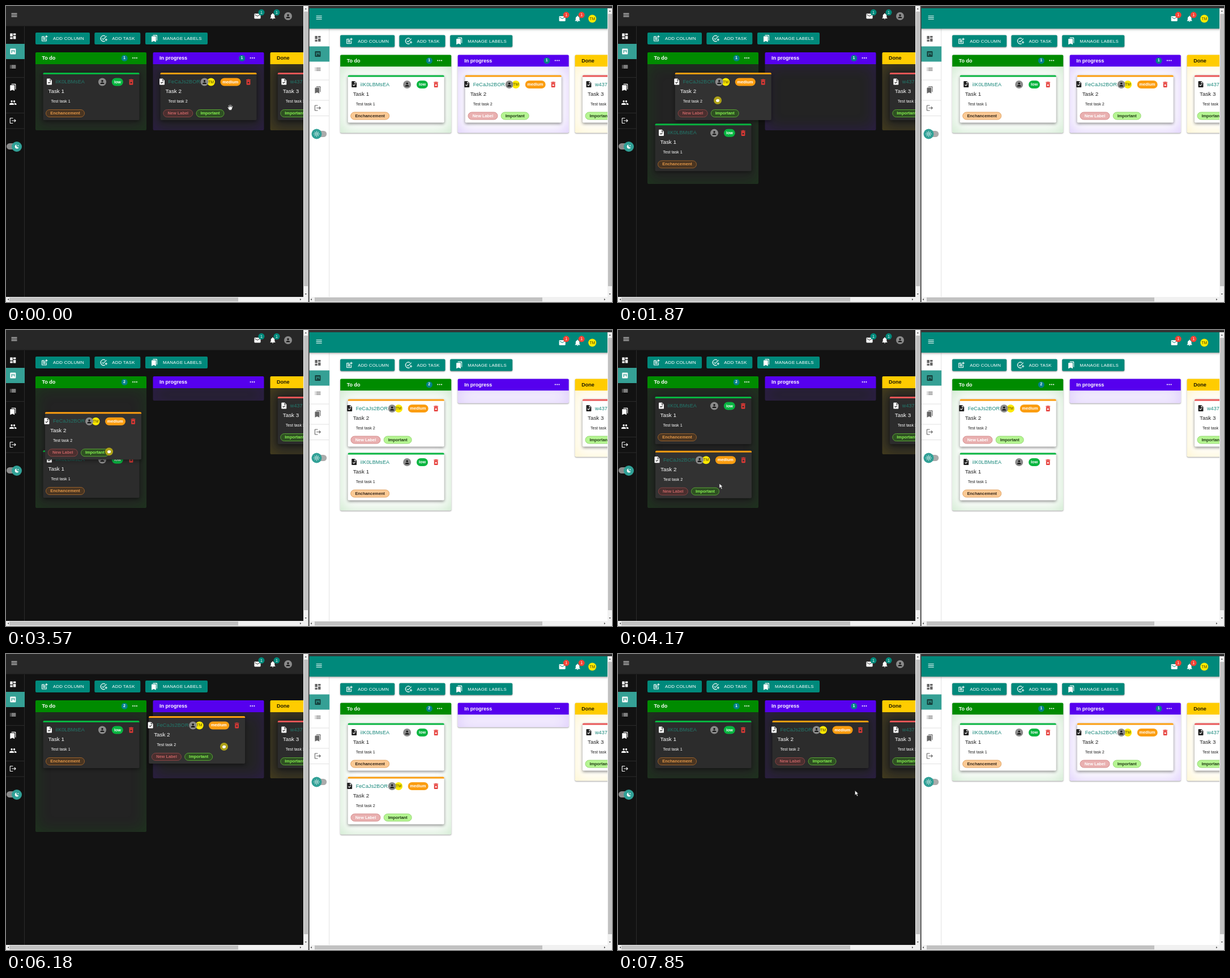
An HTML page that plays this animation: 1070 by 524 pixels, repeating every 7.92 s.

```html
<!DOCTYPE html>
<html lang="en">
<head>
<meta charset="utf-8">
<title>Task boards</title>
<style>
html, body { margin: 0; width: 100%; height: 100%; overflow: hidden; background: #121212; }
body { position: relative; font: 9px "Liberation Sans", Arial, sans-serif; }
div, svg { position: absolute; left: 0; top: 0; box-sizing: border-box; }
svg { fill: currentColor; fill-rule: evenodd; overflow: visible; }
.text { line-height: 0; white-space: nowrap; }
.middle { transform: translateX(-50%); }
.panel { overflow: hidden; }

.dark { background: #121212; color: #fff; --line: #2b2b2b; --bar: #272727; --icon: #fff; --active: #fff;
  --badge: #00897b; --body: #232323; --card: #2c2c2c; --ink: #fff; --link: #22776b;
  --shadow: 0 2px 6px rgb(0 0 0 / .45); --glow: .2; --raise: none; }
.light { background: #fff; color: #222; --line: #e2e2e2; --bar: #00897b; --icon: #666; --active: #153f3b;
  --badge: #f44336; --body: #fff; --card: #fff; --ink: #222; --link: #17877a;
  --shadow: 0 2px 5px rgb(0 0 0 / .45); --glow: .22;
  --raise: 0 1px 1px rgb(0 0 0 / .25), 0 1px 3px rgb(0 0 0 / .25); }

.bar { background: var(--bar); color: #fff; }
.light .bar { box-shadow: 0 1px 2px rgb(0 0 0 / .2), 0 2px 3px rgb(0 0 0 / .14), 0 1px 6px rgb(0 0 0 / .12); }
.side { border-right: 1px solid var(--line); }
.rule { background: var(--line); }
.active { background: #35a095; color: var(--active); }
.badge { background: var(--badge); border-radius: 50%; color: #fff; font-size: 7px; }
.track { background: #8c8c8c; border-radius: 6px; }
.light .track { background: #ababab; }
.knob { background: #30a096; border-radius: 50%; color: #fff; }
.button { background: #00897b; border-radius: 2px; color: #fff; box-shadow: var(--raise);
  font-size: 7.85px; letter-spacing: .0286em; }

.column { border-radius: 2px; box-shadow: var(--raise); }
.head { background: rgb(var(--accent)); border-radius: 2px 2px 0 0; color: #fff; font-weight: bold; }
.head.bright { color: #1c1800; }
.body { background: var(--body); border-radius: 0 0 2px 2px;
  box-shadow: inset 0 0 28px rgb(var(--accent) / var(--glow)); }
.count { background: #00808a; border-radius: 50%; font-size: 7px; }

.card { background: var(--card); color: var(--ink); border-radius: 2px; box-shadow: var(--shadow); }
.card.lifted { background: #323232; }
.stripe { border-radius: 2px 2px 0 0; }
.id { color: var(--link); letter-spacing: .0094em; }
.title { font-size: 9.85px; }
.note { font-size: 7.15px; }
.chip { border-radius: 7px; color: #fff; font-size: 7.25px; font-weight: bold; }
.label { border: 1px solid; border-radius: 7px; font-size: 7.4px; font-weight: bold; }
.avatar { background: #8a8a8a; color: #151515; border-radius: 50%; }
.initials { background: #ffe900; color: #4c4600; border-radius: 50%; font-size: 7px; }
.bin { color: #e53935; }
.dark .orange { background: #4a3521; border-color: #96602c; color: #e09648; }
.dark .red { background: #4b2f2f; border-color: #854444; color: #c56464; }
.dark .green { background: #2e5022; border-color: #58a236; color: #86f04f; }
.light .orange { background: #fbc994; border-color: #e0a466; color: #33261a; }
.light .red { background: #e9b0b0; border-color: #d68f8f; color: #fff; }
.light .green { background: #b5f592; border-color: #98d876; color: #1f3a13; }

.scroll { background: #f1f1f1; }
.thumb { background: #c1c1c1; }
.arrow { color: #505050; }
#cursor svg { color: #fff; }
#cursor .hand, #cursor .pointer { stroke: #222; stroke-width: 1.2; }
.halo { background: #aca018; border-radius: 50%; }
</style>
</head>
<body>
<script>
const LOOP = 7920;
const PITCH = 95;
const FIRST = [65.5, 118], SECOND = [65.5, 118 + PITCH], NEXT = [272.5, 118];

const icons = {
  menu: 'M3 18h18v-2H3zm0-5h18v-2H3zm0-7v2h18V6z',
  dashboard: 'M3 13h8V3H3zm0 8h8v-6H3zm10 0h8V11h-8zm0-18v6h8V3z',
  board: 'M5 3h14a2 2 0 0 1 2 2v14a2 2 0 0 1-2 2H5a2 2 0 0 1-2-2V5a2 2 0 0 1 2-2zm2 4v10h2.5V7zm4 0v5h2.5V7zm4 0v8h2.5V7z',
  list: 'M3 13h2v-2H3zm0 4h2v-2H3zm0-8h2V7H3zm4 4h14v-2H7zm0 4h14v-2H7zM7 7v2h14V7z',
  bookmarks: 'M19 18l2 1V3c0-1.1-.9-2-2-2H9C7.9 1 7 1.9 7 3h10c1.1 0 2 .9 2 2zM15 5H5c-1.1 0-2 .9-2 2v16l7-3 7 3V7c0-1.1-.9-2-2-2z',
  people: 'M16 11a3 3 0 1 0 0-6 3 3 0 0 0 0 6zm-8 0a3 3 0 1 0 0-6 3 3 0 0 0 0 6zm0 2c-2.3 0-7 1.2-7 3.5V19h14v-2.5C15 14.2 10.3 13 8 13zm8 0-1 .1c1.2.8 2 1.9 2 3.4V19h6v-2.5c0-2.3-4.7-3.5-7-3.5z',
  logout: 'M17 7l-1.4 1.4L18.2 11H8v2h10.2l-2.6 2.6L17 17l5-5zM4 5h8V3H4c-1.1 0-2 .9-2 2v14c0 1.1.9 2 2 2h8v-2H4z',
  mail: 'M20 4H4c-1.1 0-2 .9-2 2v12c0 1.1.9 2 2 2h16c1.1 0 2-.9 2-2V6c0-1.1-.9-2-2-2zm0 4l-8 5-8-5V6l8 5 8-5z',
  bell: 'M12 22c1.1 0 2-.9 2-2h-4c0 1.1.9 2 2 2zm6-6v-5c0-3.1-1.6-5.6-4.5-6.3V4a1.5 1.5 0 0 0-3 0v.7C7.6 5.4 6 7.9 6 11v5l-2 2v1h16v-1z',
  person: 'M12 12a4 4 0 1 0 0-8 4 4 0 0 0 0 8zm0 2c-2.7 0-8 1.3-8 4v2h16v-2c0-2.7-5.3-4-8-4z',
  addColumn: 'M17 19H5V7h7V5H5c-1.1 0-2 .9-2 2v12c0 1.1.9 2 2 2h12c1.1 0 2-.9 2-2v-7h-2zM19 2h-2v3h-3v2h3v3h2V7h3V5h-3zM7 9h8v2H7zm0 3h8v2H7zm0 3h8v2H7z',
  addTask: 'M22 5.2 10.6 16.6 6.4 12.4l1.4-1.4 2.8 2.8 10-10zM12 20a8 8 0 1 1 4.3-14.7l1.4-1.5A10 10 0 1 0 16.8 20.8l-1.5-1.5A8 8 0 0 1 12 20zm7-5h-3v2h3v3h2v-3h3v-2h-3v-3h-2z',
  task: 'M14 2H6c-1.1 0-2 .9-2 2v16c0 1.1.9 2 2 2h12c1.1 0 2-.9 2-2V8zm-3 16-3.6-3.5L8.8 13l2.2 2.2 4.2-4.3 1.4 1.4zM13 9V3.5L18.5 9z',
  bin: 'M6 19c0 1.1.9 2 2 2h8c1.1 0 2-.9 2-2V7H6zm2.5-7.1 1.4-1.4 2.1 2.1 2.1-2.1 1.4 1.4-2.1 2.1 2.1 2.1-1.4 1.4-2.1-2.1-2.1 2.1-1.4-1.4 2.1-2.1zM15.5 4l-1-1h-5l-1 1H5v2h14V4z',
  dots: 'M6 10a2 2 0 1 0 0 4 2 2 0 0 0 0-4zm6 0a2 2 0 1 0 0 4 2 2 0 0 0 0-4zm6 0a2 2 0 1 0 0 4 2 2 0 0 0 0-4z',
  moon: 'M11 4a8 8 0 1 0 9 11A8 8 0 0 1 11 4zm6 1 1 2 2 1-2 1-1 2-1-2-2-1 2-1z',
  sun: 'M12 7a5 5 0 1 0 0 10 5 5 0 0 0 0-10zm0 2a3 3 0 1 1 0 6 3 3 0 0 1 0-6zM11 1h2v4h-2zm0 18h2v4h-2zM1 11h4v2H1zm18 0h4v2h-4zM4 5.5 5.5 4 8 6.5 6.500 8zm12 12 1.5-1.5 2.5 2.5-1.5 1.5zM4 18.5 6.5 16 8 17.5 5.5 20zm12-12L18.5 4 20 5.5 17.5 8z',
  up: 'M12 8l5 7H7z', down: 'M12 16l5-7H7z', left: 'M8 12l7-5v10z', right: 'M16 12l-7-5v10z',
  pointer: 'M6 4v16l4-4 3 7 3-1.3-3-6.7h5z',
  hand: 'M8 22 3 13l2-2 3 3L5 6l2-1 3 6V3h2.5l.5 8 2-7 2 .5-1 8 3-5 2 1-3 9-2 4.5z',
  fist: 'M7 20 4 14V10l3-1V7l3-1 2 .5 3-.5 2 1.5 3 1v6l-3 5z'
};

// Everything is placed by transform so that fractional positions are not rounded.
const box = (x, y, w, h, cls = '', inner = '', style = '') =>
  `<div class="${cls}" style="transform:translate(${x}px,${y}px);width:${w}px;height:${h}px;${style}">${inner}</div>`;
const text = (x, y, str, cls = '') => `<div class="text ${cls}" style="left:${x}px;top:${y}px">${str}</div>`;
const icon = (name, cx, cy, size = 13.4, cls = '') =>
  `<svg class="${cls}" viewBox="0 0 24 24" width="${size}" height="${size}" style="transform:translate(${cx - size / 2}px,${cy - size / 2}px)"><path d="${icons[name]}"/></svg>`;
const disc = (cx, cy, r, cls, inner = '') => box(cx - r, cy - r, 2 * r, 2 * r, cls, inner);
const avatar = (cx, cy) => disc(cx, cy, 7, 'avatar', icon('person', 7, 7, 10.5));
const initials = (cx, cy) => disc(cx, cy, 7, 'initials', text(7, 7, 'TM', 'middle'));
const badge = (cx, cy) => disc(cx, cy, 5.5, 'badge', text(5.5, 5.5, '1', 'middle'));

const button = (x, w, name, label) =>
  box(x, 47, w, 21, 'button', icon(name, 16, 10.5) + text(31, 10.5, label));

const column = (x, rgb, name, cls, extra = '') =>
  box(x, 82, 196, 138, `column ${cls}`,
    box(0, 0, 196, 21, `head ${extra}`, text(11.5, 9.8, name) +
      disc(157, 10, 5.3, 'count', text(5.3, 5.3, '1', 'middle')) + icon('dots', 175.5, 10)) +
    box(0, 21, 196, 117, 'body'), `--accent:${rgb}`);

const pill = (x, w, str, cls) => box(x, 65, w, 14, `label ${cls}`, text(w / 2 - 1, 6, str, 'middle'));

function card({ cls, number, id, color, inset = 11, chip, chipX, chipW, people, labels }) {
  return box(0, 0, 170, 83.5, `card ${cls}`,
    box(0, 0, 170, 3, 'stripe', '', `background:${color}`) +
    icon('task', inset, 16) + text(inset + 11, 16, id, 'id') + people +
    box(chipX, 9.5, chipW, 13.5, 'chip', text(chipW / 2, 6.7, chip, 'middle'), `background:${color}`) +
    icon('bin', 155.5, 16.5, 13.4, 'bin') +
    text(9, 33, `Task ${number}`, 'title') + text(14, 51, `Test task ${number}`, 'note') + labels);
}

function app(dark) {
  const shift = dark ? 0 : -27;
  const sideIcons = [['dashboard', 53.5], ['list', 107.5], ['bookmarks', 144], ['logout', 203 + shift]];
  if (dark) sideIcons.push(['people', 171]);
  const toggle = dark
    ? box(1, 243, 22, 11, 'track') + disc(19, 249, 9, 'knob', icon('moon', 9, 9, 11))
    : box(8, 216.5, 20, 11, 'track') + disc(10.3, 222, 9, 'knob', icon('sun', 9, 9, 11));
  return box(-4, 36, 37, 500, 'side') +
    box(-4, -.5, 560, 36, 'bar', icon('menu', 18.5, 16.5) +
      icon('mail', 448, 18.5) + badge(455, 11.8) + icon('bell', 475, 18.5) + badge(482, 11.8) +
      (dark ? avatar(502, 18.5) : initials(501, 18.5))) +
    [126, 189 + shift, 216.5 + shift].map(y => box(-4, y, 36, 1, 'rule')).join('') +
    box(-4, 67, 36.5, 27, 'active', icon('board', 16.3, 13.5)) +
    `<div style="color:var(--icon)">${sideIcons.map(([n, y]) => icon(n, 12.3, y)).join('')}${toggle}</div>` +
    button(52, 95.5, 'addColumn', 'ADD COLUMN') +
    button(156.3, 81, 'addTask', 'ADD TASK') +
    button(246, 109.5, 'bookmarks', 'MANAGE LABELS') +
    column(52, '0 139 0', 'To do', 'todo') +
    column(259.5, '86 0 238', 'In progress', 'progress') +
    column(466.5, '255 204 0', 'Done', 'done', 'bright') +
    card({ cls: 'three', number: 3, id: 'w437', color: '#e85656', chip: 'high', chipX: 120, chipW: 24,
      people: '', labels: pill(4.5, 50, 'Important', 'green') }) +
    card({ cls: 'one', number: 1, id: 'iIK0LBMsEA', color: '#08b540', chip: 'low', chipX: 121.3, chipW: 20.3,
      people: avatar(104.5, 16.5), labels: pill(4.5, 69, 'Enchancement', 'orange') }) +
    card({ cls: 'two', number: 2, id: 'FeCaJs2BOR', color: '#fb9d10', inset: 3, chip: 'medium', chipX: 106, chipW: 35.5,
      people: initials(89.5, 16.5) + avatar(78, 16.5),
      labels: pill(4.8, 53, 'New Label', 'red') + pill(63, 50, 'Important', 'green') });
}

const scrollbars = (x, y, right, thumbX, thumbW) =>
  box(x, 515, right - x + 8.5, 9, 'scroll') + box(right, y, 8.5, 515 - y, 'scroll') +
  box(thumbX, 516, thumbW, 7, 'thumb') + box(right + 1, y + 10, 7, 486 - y, 'thumb') +
  icon('up', right + 4.3, y + 5, 8, 'arrow') + icon('down', right + 4.3, 510, 8, 'arrow') +
  icon('left', x + 4, 519.5, 8, 'arrow') + icon('right', right - 5, 519.5, 8, 'arrow');

document.body.innerHTML =
  box(0, 0, 525, 515, 'panel dark', box(0, 0, 0, 0, 'app', app(true))) +
  box(535, 0, 535, 4, '', '', 'background:#333') +
  box(535, 4, 527, 511, 'panel light', box(3.2, .5, 0, 0, 'app', app(false))) +
  scrollbars(0, 0, 525, 6, 404) + scrollbars(535, 4, 1062, 545, 402) +
  box(533.7, 0, 2, 524, '', '', 'background:#4a4a4a') +
  `<div id="cursor">${disc(0, 0, 7, 'halo')}${
    ['hand', 'fist', 'pointer'].map(n => icon(n, 0, 0, n === 'fist' ? 9 : 12.5, n)).join('')}</div>`;

// Rows are time, x, y; the value runs straight from row to row.
const cardPath = [
  [0, ...NEXT], [1470, ...NEXT], [1600, 250, 117], [1750, 168, 116], [1870, 101, 118], [1960, 77, 121],
  [2070, 71, 124], [2270, 71, 124], [2400, 67, 120], [2600, ...FIRST],
  [3170, ...FIRST], [3400, 67, 127], [3570, 69, 145], [3740, 71, 185], [3910, 69, 215.5], [3970, 69, 215.5],
  [4170, 66, 213.7], [4300, ...SECOND],
  [5640, ...SECOND], [5740, 78, 207], [5840, 113, 188], [6000, 188, 144], [6180, 252, 110], [6320, 271, 106],
  [6450, 271, 106], [6600, 272, 115], [6780, ...NEXT]
];
const cursorPath = [
  [260, 396, 179], [540, 379, 171], [1470, 379, 171], [1600, 313, 167], [1750, 213, 165], [1870, 176, 167],
  [2070, 178, 178], [3170, 178, 178], [3400, 180, 193], [3570, 182, 215], [3740, 183, 250], [3910, 182, 276],
  [4440, 182, 276], [4640, 187, 271], [5110, 187, 271], [5300, 178, 271], [5640, 178, 271], [5740, 215, 250],
  [5840, 270, 221], [6000, 330, 188], [6180, 385, 164], [7710, 385, 164], [7850, 421.5, 246]
];

function along(path, t) {
  const i = path.findIndex(row => row[0] > t);
  if (i < 1) return path.at(i).slice(1);
  const [a, b] = [path[i - 1], path[i]];
  const p = (t - a[0]) / (b[0] - a[0]);
  return [1, 2].map(k => a[k] + (b[k] - a[k]) * p);
}
const during = (t, ...spans) => spans.some(([from, to]) => t >= from && t < to);
const ease = p => 1 - (1 - Math.min(1, Math.max(0, p))) ** 4;
const place = (el, [x, y]) => { el.style.transform = `translate(${x}px,${y}px)`; };

const boards = ['.dark', '.light'].map(name => {
  const find = sel => document.querySelector(`${name} ${sel}`);
  place(find('.three'), [479.8, 118]);
  return { one: find('.one'), two: find('.two'), columns: [find('.todo'), find('.progress')] };
});

function show(board, one, two, slots, counts) {
  place(board.one, one);
  place(board.two, two);
  board.columns.forEach((col, i) => {
    const height = 22 + PITCH * slots[i];
    col.style.height = `${height + 21}px`;
    col.querySelector('.body').style.height = `${height}px`;
    const count = col.querySelector('.count');
    count.style.visibility = counts[i] ? 'visible' : 'hidden';
    count.firstChild.textContent = counts[i];
  });
}

const cursor = document.getElementById('cursor');
const [halo, hand, fist, pointer] = cursor.children;

function draw(t) {
  const [dark, light] = boards;

  const moved = during(t, [2600, 6780]);
  const oneY = 118 + PITCH * (ease((t - 1765) / 200) - ease((t - 3640) / 200));
  show(dark, [65.5, t < 6780 ? oneY : 118], along(cardPath, t),
    [during(t, [1765, 6780]) ? 2 : 1, during(t, [2600, 6000]) ? 0 : 1], moved ? [2, 0] : [1, 1]);
  dark.two.classList.toggle('lifted', during(t, [1470, 2600], [3170, 4300], [5640, 6780]));

  const synced = during(t, [2900, 7120]);
  const onTop = during(t, [2900, 4640]);
  show(light, onTop ? SECOND : FIRST, onTop ? FIRST : synced ? SECOND : NEXT,
    synced ? [2, 0] : [1, 1], synced ? [2, 0] : [1, 1]);

  const grabbing = during(t, [1330, 2270], [3170, 3970], [5640, 6450]);
  const pointing = during(t, [2270, 2600], [3970, 4440], [6450, 6780], [7780, LOOP]);
  halo.style.display = fist.style.display = grabbing ? '' : 'none';
  pointer.style.display = pointing ? '' : 'none';
  hand.style.display = grabbing || pointing ? 'none' : '';
  place(cursor, along(cursorPath, t));
}

function tick() {
  draw(performance.now() % LOOP);
  requestAnimationFrame(tick);
}
tick();
</script>
</body>
</html>
```
